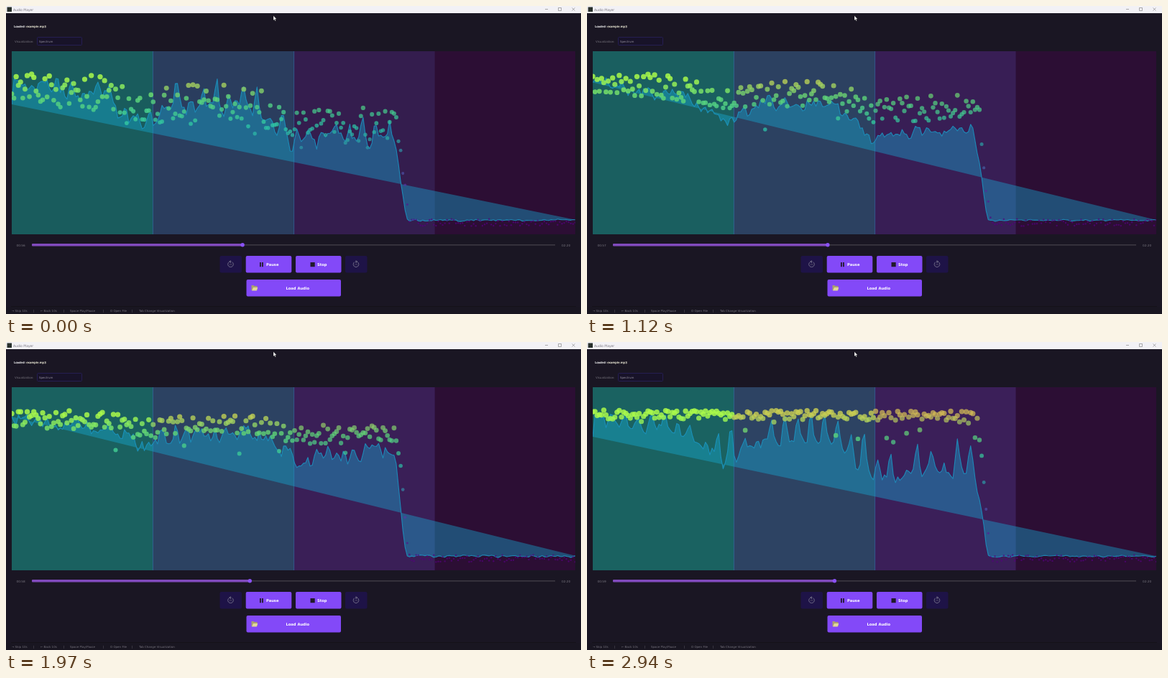
Write an HTML page with a canvas that moves like this. It is 800 px wide and 429 px high and loops after 2.97 s.

```html
<!DOCTYPE html>
<html lang="en">
<head>
<meta charset="utf-8">
<title>Audio Player</title>
<style>
  html, body { margin: 0; width: 100%; height: 100%; overflow: hidden; background: #1a1623; }
  svg, canvas { position: absolute; left: 0; top: 0; width: 800px; height: 429px; }
  text { font: 4px "DejaVu Sans", sans-serif; fill: #77747e; white-space: pre; }
  .label { font-weight: bold; font-size: 5.2px; fill: #fff; }
  .main { fill: #8349f8; }
  .skip { fill: #1e1347; }
  .icon { fill: none; stroke: #77728c; stroke-width: .9; }
</style>
</head>
<body>
<svg viewBox="0 0 800 429">
  <rect width="800" height="10" fill="#f2f1f5"/>
  <rect x="1.5" y="1.5" width="6.5" height="6.5" fill="#28302c"/>
  <text x="10" y="6.6" style="font-size:4.5px">Audio Player</text>
  <path d="M750 4.5h4M768.5 2.5h4v4h-4zM787.5 2.5l4 4m0-4l-4 4" fill="none" stroke="#777" stroke-width=".6"/>

  <text x="11" y="30.4" style="fill:#fff;stroke:#fff;stroke-width:.15">Loaded: <tspan fill="#f5f0c8">example.mp3</tspan></text>
  <text x="12" y="50.5">Visualization:</text>
  <rect x="43.5" y="43.5" width="62" height="11" rx="1" fill="#181329" stroke="#251e52"/>
  <text x="46" y="50.5" style="fill:#96929f">Spectrum</text>

  <text id="now" x="14.5" y="334.6" style="font-size:4.2px"></text>
  <text x="773" y="334.6" style="font-size:4.2px">02:20</text>
  <rect x="36" y="332" width="728" height="1.6" fill="#3c3842"/>
  <rect id="played" x="36" y="331" width="0" height="3.6" rx="1" fill="#814bbd"/>
  <circle id="knob" cy="332.8" r="2.7" fill="#8a52f5"/>

  <rect class="skip" x="297.5" y="348" width="30.5" height="23.5" rx="2"/>
  <rect class="skip" x="472" y="348" width="30.5" height="23.5" rx="2"/>
  <path class="icon" d="M310.4 356.6a3.8 3.8 0 1 0 4.2 0M312.7 354.8v2.6l-2.2-1.3z"/>
  <path class="icon" d="M484.9 356.6a3.8 3.8 0 1 0 4.2 0M486.8 354.8v2.6l2.2-1.3z"/>
  <text x="310.6" y="361" style="font-size:3px">10</text>
  <text x="485.1" y="361" style="font-size:3px">10</text>
  <rect class="main" x="333.7" y="348" width="63.6" height="23.5" rx="2"/>
  <rect class="main" x="403" y="348" width="63.5" height="23.5" rx="2"/>
  <rect class="main" x="334.5" y="381" width="131.5" height="23.5" rx="2"/>
  <path d="M353 357h1.8v6.2H353zM356 357h1.8v6.2H356zM423.5 357h6.2v6.2h-6.2z" fill="#211a2a"/>
  <text class="label" x="362" y="361.9">Pause</text>
  <text class="label" x="433" y="361.9">Stop</text>
  <text class="label" x="389.5" y="395">Load Audio</text>
  <path d="M341.5 389h3l1 1h4v6h-8z" fill="#a9a070"/>
  <path d="M342 396.5l2-4.5h6.3l-1.6 4.5z" fill="#e0d79a"/>

  <path d="M7 418.5H793" stroke="#151219"/>
  <rect y="419" width="800" height="10" fill="#191621"/>
  <text x="8" y="425.8">→ Skip 10s</text>
  <text x="38" y="425.8">|</text>
  <text x="48" y="425.8">← Back 10s</text>
  <text x="79.5" y="425.8">|</text>
  <text x="89" y="425.8">Space Play/Pause</text>
  <text x="135" y="425.8">|</text>
  <text x="145" y="425.8">O Open File</text>
  <text x="175" y="425.8">|</text>
  <text x="185" y="425.8">Tab Change Visualization</text>
</svg>
<canvas width="800" height="429"></canvas>
<svg viewBox="0 0 800 429">
  <path d="M372 13.5v6.6l1.5-1.4 1 2.2 1-.5-1-2.1h2z" fill="#fff" stroke="#000" stroke-width=".3"/>
</svg>
<script>
const LOOP = 2970, TICK = 30, BINS = 256, LEFT = 8, WIDTH = 784, TOP = 63, HEIGHT = 255, FLOOR = 298.5;
const ctx = document.querySelector('canvas').getContext('2d');
const byId = id => document.getElementById(id);

// One spectrum outline as [x, y]; each pose scales its depth below the loudest level.
const outline = [[8, 104], [60, 116], [130, 122], [190, 152], [235, 136], [340, 133],
  [400, 176], [440, 172], [530, 167]];
// start: left end of the line, depth: line, sag: dots, spike: harmonic peaks.
const poses = [
  { t: 0, start: 137, depth: 1.25, sag: .95, spike: 45 },
  { t: 670, start: 127, depth: .75, sag: .45, spike: 0 },
  { t: 1120, start: 106, depth: 1.1, sag: .6, spike: 0 },
  { t: 1640, start: 105, depth: .9, sag: .02, spike: 0 },
  { t: 1970, start: 104, depth: .8, sag: .42, spike: 0 },
  { t: 2360, start: 125, depth: 1.15, sag: 1.15, spike: 33 },
  { t: 2940, start: 132, depth: 1.25, sag: .02, spike: 48 }
];
const bands = [
  { base: [24, 86, 90], glow: [2, 12, 7], peak: [170, 250, 75], alpha: .85 },
  { base: [39, 56, 90], glow: [6, 11, 9], peak: [202, 207, 82], alpha: .8 },
  { base: [46, 28, 68], glow: [13, 3, 21], peak: [212, 188, 84], alpha: .72 },
  { base: [44, 14, 52], glow: [0, 0, 0], peak: [212, 188, 84], alpha: .72 }
];
const heat = [[0, [85, 0, 125]], [.28, [85, 60, 165]], [.5, [45, 150, 165]],
  [.65, [45, 195, 165]], [.84, [95, 212, 120]]];

const lerp = (a, b, u) => a + (b - a) * u;
const clamp = (v, lo = 0, hi = 1) => Math.min(hi, Math.max(lo, v));
const rgb = c => `rgb(${c.map(Math.round)})`;
const bounce = (y, top) => top + Math.abs(y - top);
const binX = i => LEFT + WIDTH * i / (BINS - 1);
const bandX = k => LEFT + 196.2 * k;

// Repeatable random value in -1..1, and one that drifts with time.
function random(a, b) {
  const s = Math.sin(a * 127.1 + b * 311.7 + 17.3) * 43758.5453;
  return 2 * (s - Math.floor(s)) - 1;
}
function drift(i, time) {
  const k = Math.floor(time);
  return lerp(random(i, k), random(i, k + 1), time - k);
}

// Value between [position, number or colour] stops.
function between(stops, x) {
  const k = clamp(stops.findIndex(s => s[0] >= x), 1, stops.length - 1);
  const last = stops[stops.length - 1];
  if (x >= last[0]) return last[1];
  const [a, from] = stops[k - 1], [b, to] = stops[k], u = clamp((x - a) / (b - a));
  return Array.isArray(from) ? from.map((v, i) => lerp(v, to[i], u)) : lerp(from, to, u);
}

function poseAt(t) {
  const k = poses.findLastIndex((p, i) => p.t <= t && i < poses.length - 1);
  const a = poses[k], b = poses[k + 1], u = clamp((t - a.t) / (b.t - a.t)), pose = {};
  for (const key in a) pose[key] = lerp(a[key], b[key], u);
  return pose;
}

// 0 inside the audible range, easing to 1 beyond the cutoff.
function cutoff(x) {
  const u = clamp((x - 537) / 23);
  return u * u * (3 - 2 * u);
}

function lineAt(i, pose, t) {
  if (!i) return pose.start;
  const x = binX(i), time = t / 150;
  const jag = (2 * drift(i, time) + drift(i + 1, time)) / 3;
  const pos = (x - 256) / 18.5, harmonic = Math.round(pos);
  const tooth = Math.exp(-(((pos - harmonic) / .2) ** 2));
  const height = .6 + .45 * drift(harmonic + 700, t / 300);
  const spike = pose.spike * tooth * height * clamp(x / 150);
  const level = 100 + (between(outline, x) - 100) * pose.depth;
  const loud = bounce(level + 16 * jag - spike, 100);
  return lerp(loud, FLOOR + 2 * jag, cutoff(x));
}

function dotAt(i, pose, t) {
  const x = binX(i), step = Math.floor(t / 60), n = random(i + 400, step);
  const stray = random(i + 900, step) > .9 ? 35 * Math.abs(random(i, 5)) : 0;
  const level = 101 + (between(outline, x) - 100) * pose.sag;
  const loud = bounce(level + (6 + 20 * pose.sag) * n + stray, 95);
  return lerp(loud, FLOOR + 3 + 5 * n, cutoff(x - 4));
}

function drawChart(t) {
  const pose = poseAt(t), glow = clamp(1 - .6 * pose.sag ** 2);
  ctx.clearRect(0, 0, 800, 429);
  ctx.save();
  ctx.beginPath();
  ctx.rect(LEFT, TOP, WIDTH, HEIGHT);
  ctx.clip();

  bands.forEach((band, k) => {
    ctx.fillStyle = rgb(band.base.map((v, i) => v + band.glow[i] * glow));
    ctx.fillRect(bandX(k), TOP, WIDTH, HEIGHT);
  });
  ctx.fillStyle = 'rgba(50,120,175,.6)';
  for (const k of [1, 2]) ctx.fillRect(bandX(k) - .3, TOP, 1, HEIGHT);

  const line = new Path2D();
  for (let i = 0; i < BINS; i++) line.lineTo(binX(i), lineAt(i, pose, t));
  ctx.fillStyle = 'rgba(22,172,214,.4)';
  ctx.fill(line);
  ctx.strokeStyle = 'rgba(28,150,195,.85)';
  ctx.lineWidth = 1.1;
  ctx.lineJoin = 'round';
  ctx.stroke(line);

  for (let i = 0; i < BINS; i++) {
    const x = binX(i), y = dotAt(i, pose, t), v = clamp((300 - y) / 205);
    const band = bands[Math.min(3, Math.floor((x - LEFT) / 196.2))];
    ctx.globalAlpha = band.alpha;
    ctx.fillStyle = rgb(between([...heat, [.97, band.peak]], v));
    ctx.beginPath();
    ctx.arc(x, y, 1.2 + 2.5 * v, 0, 7);
    ctx.fill();
  }
  ctx.restore();
}

function drawProgress(t) {
  const seconds = 56.37 + t / 1000, x = 36 + 728 * seconds / 140;
  byId('now').textContent = '00:' + Math.floor(seconds);
  byId('played').setAttribute('width', x - 36);
  byId('knob').setAttribute('cx', x);
}

const begin = performance.now();
function frame() {
  const t = Math.floor((performance.now() - begin) % LOOP / TICK) * TICK;
  drawChart(t);
  drawProgress(t);
  requestAnimationFrame(frame);
}
frame();
</script>
</body>
</html>
```
